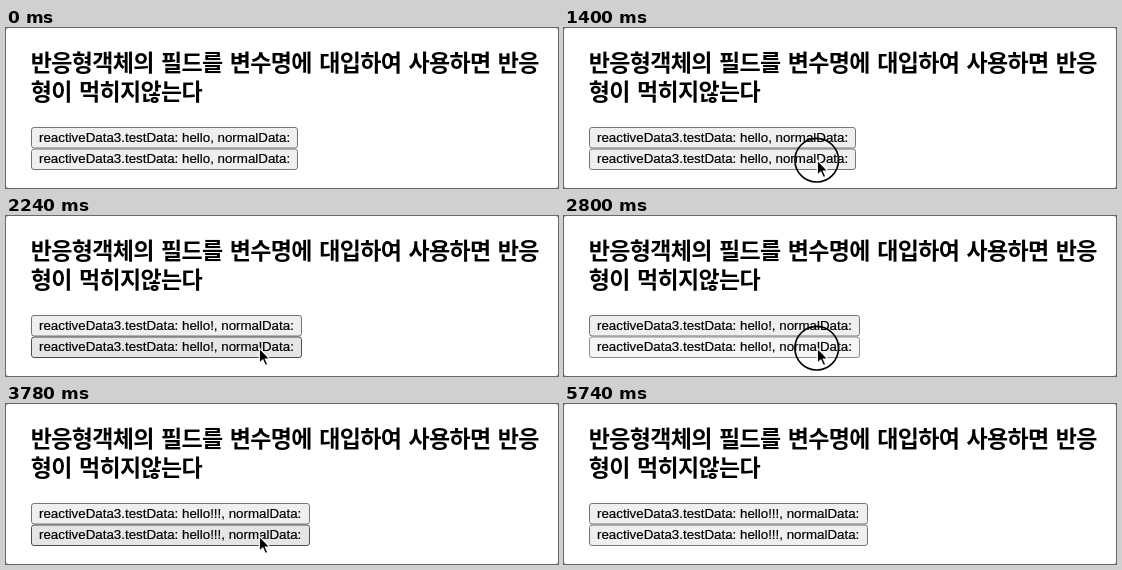
Write an HTML page that moves like this. It is 552x160 px and loops after 6.02 s.

```html
<!DOCTYPE html>
<html lang="ko">
<head>
<meta charset="utf-8">
<style>
  html, body { margin: 0; width: 100%; height: 100%; overflow: hidden; background: #999; }
  svg { display: block; }
  .title { font: bold 23px "Noto Sans CJK KR", "Noto Sans CJK", sans-serif; letter-spacing: -.66px; word-spacing: 1.5px; }
  .label { font: 13.333px "Liberation Sans", Arial, sans-serif; stroke: #000; stroke-width: .2px; }
</style>
</head>
<body>
<svg width="552" height="160" viewBox="0 0 552 160">
  <rect width="552" height="160" rx="3" fill="#fff"/>
  <g class="title">
    <text x="24.8" y="43">반응형객체의 필드를 변수명에 대입하여 사용하면 반응</text>
    <text x="24.8" y="71.5">형이 먹히지않는다</text>
  </g>
  <g class="button" transform="translate(25 99)">
    <rect x=".5" y=".5" height="20.5" rx="2.5" fill="#efefef" stroke="#767676"/>
    <text class="label" x="8" y="15"></text>
  </g>
  <g class="button" transform="translate(25 120.5)">
    <rect x=".5" y=".5" height="20.5" rx="2.5" fill="#efefef" stroke="#767676"/>
    <text class="label" x="8" y="14.5"></text>
  </g>
  <circle id="ring" cx="252.7" cy="132.2" r="21.8" fill="none" stroke="#000" stroke-width="1.6"/>
  <path id="cursor" d="M0 0V15L3.5 11.8L6 17.4L8.5 16.3L6.1 10.9H10.6Z" stroke="#fff" stroke-width="1.2"/>
</svg>
<script>
const LOOP = 6020, STEP = 70;
const REST = [253.3, 132.2], ENTRY = [292, 166], EXIT = [268, 166];
const CLICKS = [[1400, 1540], [2100, 2240], [2730, 2870], [3570, 3780]];
const FOCUSED = 2030;   // the first click only focuses the window

const buttons = [...document.querySelectorAll('.button')];
const ring = document.getElementById('ring');
const cursor = document.getElementById('cursor');

const clamp = x => Math.max(0, Math.min(1, x));
const mix = (a, b, k) => a.map((v, i) => v + (b[i] - v) * k);

function pointerAt(t) {
  const enter = 1 - (1 - clamp(t / 350)) ** 2;
  const leave = clamp((t - 5320) / 420) ** 2;
  return t < 5320 ? mix(ENTRY, REST, enter) : mix(REST, EXIT, leave);
}

function draw(t) {
  const pointer = pointerAt(t);
  const pressed = CLICKS.some(([down, up]) => t >= down && t < up);
  const clicks = CLICKS.slice(1).filter(([, up]) => t >= up).length;
  const hovered = t >= FOCUSED && pointer[1] < 142;

  buttons.forEach((button, i) => {
    const [box, label] = button.children;
    const text = `reactiveData3.testData: hello${'!'.repeat(clicks)}, normalData:`;
    if (label.textContent !== text) label.textContent = text;
    box.setAttribute('width', Math.ceil(266 + 3.7 * clicks));
    const [fill, stroke] = i === 0 || !hovered ? ['#efefef', '#767676']
      : pressed ? ['#f5f5f5', '#8d8d8d'] : ['#e5e5e5', '#4f4f4f'];
    box.setAttribute('fill', fill);
    box.setAttribute('stroke', stroke);
  });

  ring.style.display = pressed ? '' : 'none';
  cursor.setAttribute('transform', `translate(${pointer})`);
}

const start = performance.now();
function frame() {
  const t = (performance.now() - start) % LOOP;
  draw(Math.floor(t / STEP) * STEP);
  requestAnimationFrame(frame);
}
frame();
</script>
</body>
</html>
```
